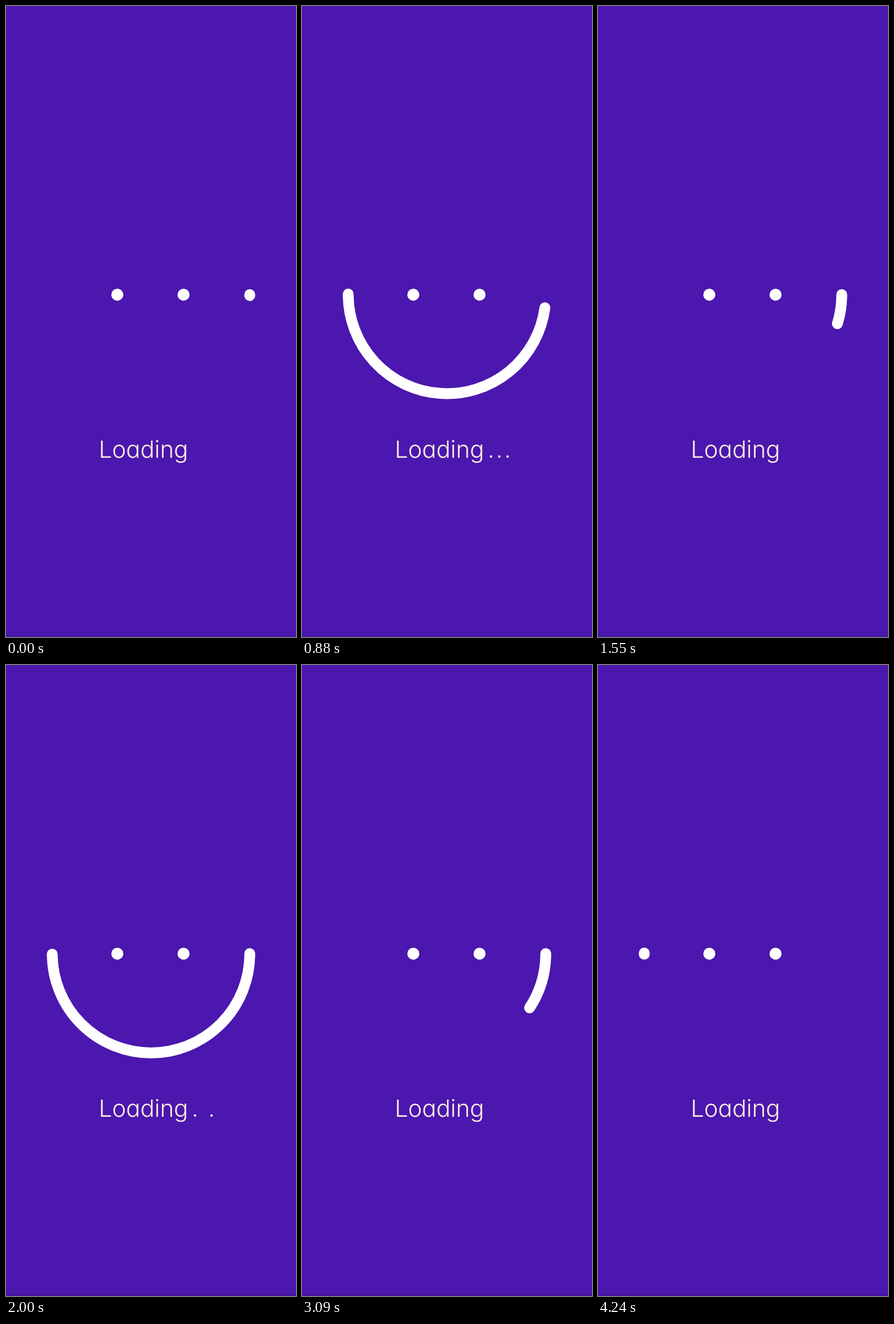
These frames come from a looping animation (508x1102 px, 4270 ms). An HTML page:

```html
<!DOCTYPE html>
<html lang="en">
<head>
<meta charset="utf-8">
<title>Loading</title>
<style>
  html, body { margin: 0; width: 100%; height: 100%; overflow: hidden; background: #4b17ae; }
  svg { display: block; width: 100%; height: 100%; }
  text { font: 350 41.5px Inter, sans-serif; font-feature-settings: "cv11"; fill: #fdf2e2; }
  .period { text-anchor: middle; }
</style>
</head>
<body>
<svg viewBox="0 0 508 1102">
  <rect width="508" height="1102" fill="#4b17ae"/>
  <rect y="1100" width="508" height="2" fill="#43149b"/>
  <circle cx="195" cy="504.2" r="10.5" fill="#fff"/>
  <circle cx="311" cy="504.2" r="10.5" fill="#fff"/>
  <path id="smile" fill="none" stroke="#fff" stroke-width="19" stroke-linecap="round"/>
  <text x="162.5" y="789" letter-spacing="-0.1">Loading</text>
  <text class="period" x="331" y="789">.</text>
  <text class="period" x="345.5" y="789">.</text>
  <text class="period" x="360" y="789">.</text>
</svg>
<script>
const LOOP = 4270, CYCLE = LOOP / 3, RETREAT_START = 824;
const CENTER = { x: 254, y: 504 }, RADIUS = 173, ARC_ANGLE = Math.PI * 1.002;

// Sweep along the smile: [ms, share of the arc, slope per ms]
const SWEEP = [
  [0, 0, 0.00075],
  [244, 0.184, 0.0008],
  [333, 0.266, 0.0013],
  [570, 0.996, 0.00004],
  [760, 1, 0],
];

// Visible span of each trailing period within a cycle, in ms
const PERIOD_SPANS = [[300, 1320], [580, 1040], [440, 1220]];

const smile = document.getElementById("smile");
const periods = document.querySelectorAll(".period");

function sweep(ms) {
  if (ms <= 0) return 0;
  const next = SWEEP.findIndex(point => point[0] > ms);
  if (next < 0) return 1;
  const [t0, v0, m0] = SWEEP[next - 1];
  const [t1, v1, m1] = SWEEP[next];
  const span = t1 - t0, x = (ms - t0) / span, y = 1 - x;
  return v0 * y * y * (1 + 2 * x) + v1 * x * x * (3 - 2 * x)
    + span * x * y * (m0 * y - m1 * x);
}

function arcPoint(share) {
  const angle = ARC_ANGLE * share;
  const x = CENTER.x + RADIUS * Math.cos(angle);
  const y = CENTER.y + RADIUS * Math.sin(angle);
  return `${x.toFixed(2)} ${y.toFixed(2)}`;
}

function draw(now) {
  const phase = (now % LOOP) % CYCLE;
  const from = Math.min(sweep(phase - RETREAT_START), 0.997);
  const to = Math.max(sweep(phase), 0.003);
  const large = (to - from) * ARC_ANGLE > Math.PI ? 1 : 0;
  smile.setAttribute("d", `M${arcPoint(from)}A${RADIUS} ${RADIUS} 0 ${large} 1 ${arcPoint(to)}`);
  periods.forEach((period, i) => {
    const [start, end] = PERIOD_SPANS[i];
    period.style.visibility = phase >= start && phase < end ? "visible" : "hidden";
  });
}

const startTime = performance.now();
function tick() {
  draw(performance.now() - startTime);
  requestAnimationFrame(tick);
}
tick();
</script>
</body>
</html>
```
